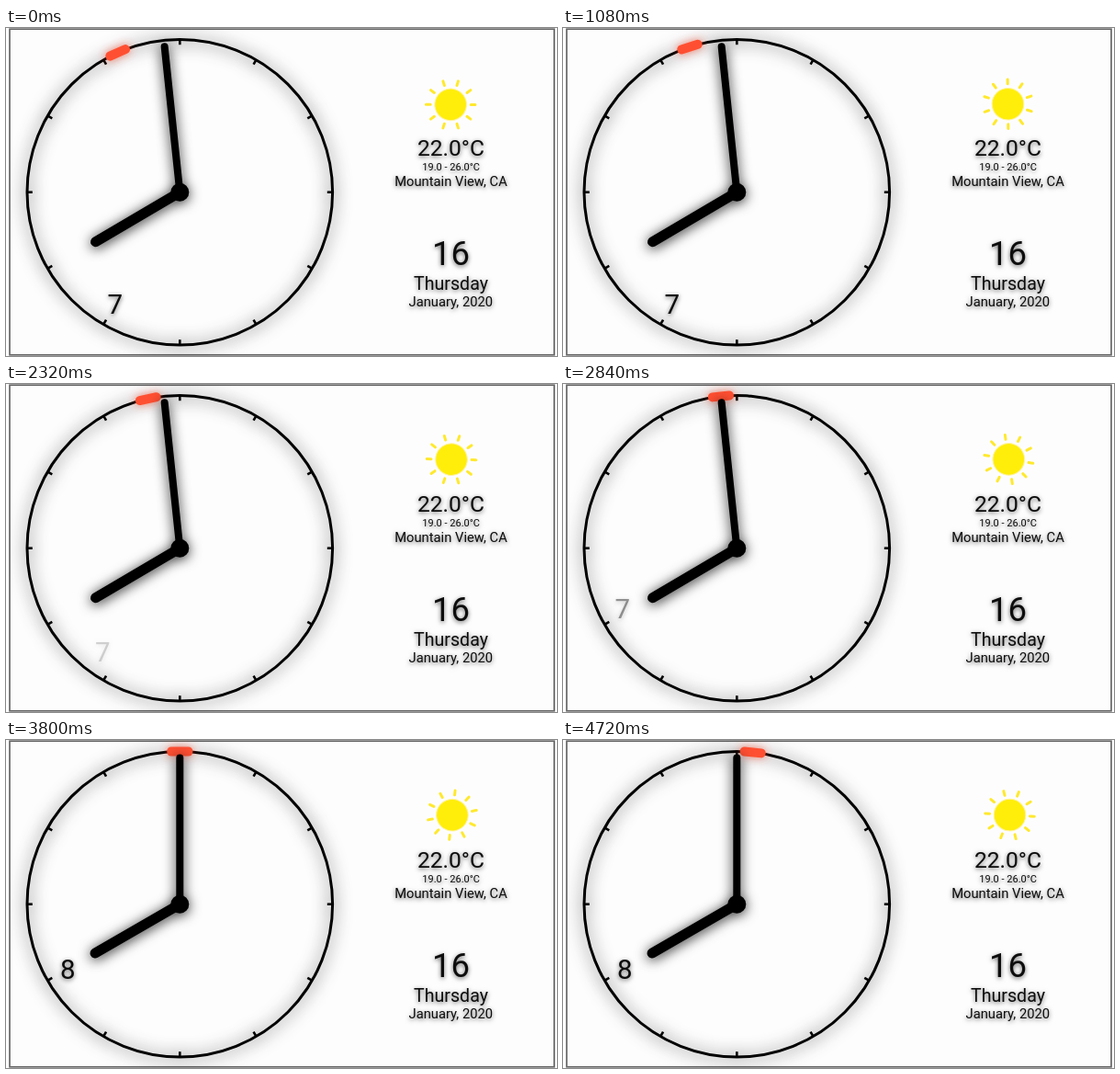
These frames come from a looping animation (600x357 px, 4760 ms). An HTML page:

```html
<!DOCTYPE html>
<html lang="en">
<head>
<meta charset="utf-8">
<title>Clock</title>
<style>
  html, body { margin: 0; width: 100%; height: 100%; overflow: hidden; background: #fff; }
  svg { display: block; width: 600px; height: 357px; }
  text { font-family: Roboto, sans-serif; text-anchor: middle; fill: #0b0b0b; }
</style>
</head>
<body>
<svg viewBox="0 0 600 357">
  <defs>
    <filter id="soft" filterUnits="userSpaceOnUse" x="-30" y="-30" width="660" height="420">
      <feDropShadow dx="0" dy="1" stdDeviation="9" flood-color="#000" flood-opacity=".85"/>
    </filter>
    <filter id="deep" filterUnits="userSpaceOnUse" x="-30" y="-30" width="660" height="420">
      <feDropShadow dx="0" dy="2" stdDeviation="7" flood-color="#000" flood-opacity=".85"/>
    </filter>
    <filter id="glow" filterUnits="userSpaceOnUse" x="-30" y="-30" width="660" height="420">
      <feDropShadow dx="0" dy="0" stdDeviation="5" flood-color="#ff5030" flood-opacity=".65"/>
    </filter>
    <filter id="type" filterUnits="userSpaceOnUse" x="-30" y="-30" width="660" height="420">
      <feDropShadow dx="0" dy="1.5" stdDeviation="2.6" flood-color="#000" flood-opacity=".6"/>
    </filter>
  </defs>
  <rect x="4" y="1.2" width="593" height="354.6" fill="#fefdfe" stroke="#666" stroke-width="1.7"/>

  <g filter="url(#soft)" stroke="#000" fill="none">
    <circle cx="189.3" cy="178.7" r="166.3" stroke-width="3"/>
    <g id="ticks" stroke-width="2.6"></g>
  </g>

  <g filter="url(#type)"><text id="label" font-size="29.5"></text></g>

  <g filter="url(#glow)">
    <rect id="second" x="-14" y="-171.2" width="28" height="10" rx="4.6" fill="#ff5030"/>
  </g>

  <g filter="url(#deep)" stroke="#000" stroke-linecap="round">
    <path id="hour" d="M0 0V-106.5" stroke-width="11"/>
    <path id="minute" d="M0 0V-159.3" stroke-width="8"/>
    <circle cx="189.3" cy="178.7" r="10" stroke="none"/>
  </g>

  <g id="sun" fill="#ffee0a" stroke="#ffe92e" stroke-width="3" stroke-linecap="round">
    <circle r="17.3" stroke="#fff3a0" stroke-width="1"/>
  </g>

  <g filter="url(#type)">
    <text x="484.5" y="139" font-size="24.6">22.0°C</text>
    <text x="484.7" y="155.3" font-size="11">19.0 - 26.0°C</text>
    <text x="484.5" y="172" font-size="14.75">Mountain View, CA</text>
    <text x="484.5" y="257.7" font-size="36.5">16</text>
    <text x="484.5" y="285.2" font-size="19.6">Thursday</text>
    <text x="484.3" y="303.2" font-size="14.75">January, 2020</text>
  </g>
</svg>
<script>
const LOOP = 4760, CX = 189.3, CY = 178.7, RAYS = 10;
const TICK = 340, TICK_LEN = 200;
const MOVE = 1520, MOVE_LEN = 1900;
const el = id => document.getElementById(id);
const clamp = v => Math.min(1, Math.max(0, v));

function addLine(parent, y1, y2, transform) {
  const line = document.createElementNS('http://www.w3.org/2000/svg', 'line');
  line.setAttribute('y1', y1);
  line.setAttribute('y2', y2);
  line.setAttribute('transform', transform);
  parent.append(line);
}
for (let i = 0; i < 12; i++) addLine(el('ticks'), -166, -160.5, `translate(${CX} ${CY}) rotate(${i * 30})`);
for (let i = 0; i < RAYS; i++) addLine(el('sun'), -26.8, -22, `rotate(${i * 360 / RAYS})`);

function bezier(x1, y1, x2, y2) {
  const at = (a, b, s) => 3 * a * s * (1 - s) ** 2 + 3 * b * s * s * (1 - s) + s ** 3;
  return x => {
    if (x <= 0 || x >= 1) return clamp(x);
    let lo = 0, hi = 1;
    for (let i = 0; i < 24; i++) {
      const mid = (lo + hi) / 2;
      if (at(x1, x2, mid) < x) lo = mid; else hi = mid;
    }
    return at(y1, y2, lo);
  };
}
const smooth = bezier(0.42, 0, 0.58, 1);
const back = bezier(0.68, -0.55, 0.265, 1.55);

const turn = (id, deg, x = CX, y = CY) =>
  el(id).setAttribute('transform', `translate(${x} ${y}) rotate(${deg})`);

function draw(t) {
  const step = n => smooth((t - TICK - n * 1000) / TICK_LEN);
  let seconds = 56;
  for (let n = 0; n < 5; n++) seconds += step(n);
  turn('second', seconds * 6);

  const minute = 59 + step(3);
  turn('minute', minute * 6);
  turn('hour', 210 + minute / 2);

  // the hour label swings to the next place while fading out and in
  const p = clamp((t - MOVE) / MOVE_LEN);
  const a = (210 + 30 * back(p)) * Math.PI / 180;
  const label = el('label');
  label.textContent = p < 1 ? '7' : '8';
  label.setAttribute('x', CX + 141 * Math.sin(a));
  label.setAttribute('y', CY - 141 * Math.cos(a) + 10.5);
  label.setAttribute('opacity', Math.abs(1 - 2 * p));

  // the sun turns about a point slightly off its middle
  const b = (195 + t * 0.016) * Math.PI / 180;
  turn('sun', 18 + t * 0.016, 486.5 + 2.4 * Math.cos(b), 84 + 2.4 * Math.sin(b));
}

const start = performance.now();
function frame(now) {
  draw(Math.max(0, now - start) % LOOP);
  requestAnimationFrame(frame);
}
draw(0);
requestAnimationFrame(frame);
</script>
</body>
</html>
```
